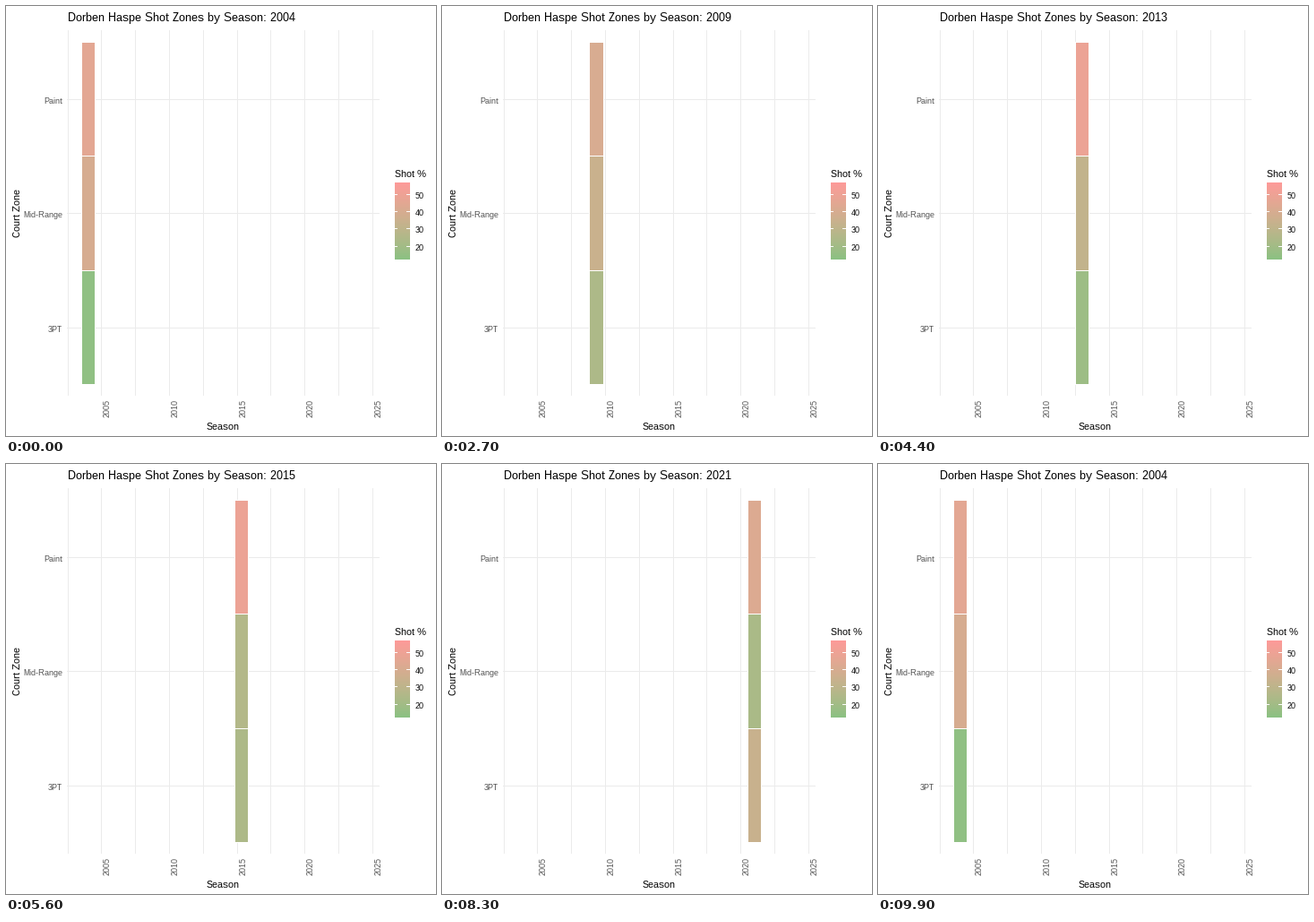
Write a matplotlib script that moves like this. It is 480x480 px and loops after 10000 ms.

```python
import numpy as np
import matplotlib.pyplot as plt
from matplotlib.animation import FuncAnimation
from matplotlib.patches import Rectangle

plt.rcParams.update({
    "font.family": "Liberation Sans",
    "text.hinting": "default",
    "text.hinting_factor": 1,
})

SIZE, DPI = 480, 72
FRAMES, INTERVAL = 100, 100
FIRST_YEAR = 2004
YEAR_W, LEFT = 15.128, 84.195    # tile width and left edge of the first tile
GRID, GREY = "#EBEBEB", "#4D4D4D"
LOW, HIGH = (138, 193, 130), (254, 154, 153)
V_MIN, V_MAX = 12.7, 57.2

# share of shots per season, in percent
three = np.array([14.5, 18.3, 20.8, 19.1, 21.9, 23.8, 25.3, 18.8, 12.7, 18.8,
                  22.6, 26.5, 19.9, 25.4, 25.7, 29.9, 32.4, 34.4, 36.7, 31.1,
                  28.6])
mid = np.array([40, 40, 36, 38, 34, 35, 34.5, 40, 38, 32, 27, 28, 22.9, 20,
                21.5, 17, 19, 23, 18, 19, 20])
shares = np.stack([100 - mid - three, mid, three], axis=1)
SEASONS = len(three)

# ---- colour scale, blended in Lab ----
RGB_XYZ = np.array([[0.4124, 0.3576, 0.1805],
                    [0.2126, 0.7152, 0.0722],
                    [0.0193, 0.1192, 0.9505]])
WHITE = RGB_XYZ.sum(axis=1)


def to_lab(rgb):
    c = np.array(rgb) / 255
    lin = np.where(c > 0.04045, ((c + 0.055) / 1.055) ** 2.4, c / 12.92)
    f = np.cbrt(RGB_XYZ @ lin / WHITE)
    return np.array([116 * f[1] - 16, 500 * (f[0] - f[1]), 200 * (f[1] - f[2])])


def to_rgb(lab):
    fy = (lab[0] + 16) / 116
    f = np.array([fy + lab[1] / 500, fy, fy - lab[2] / 200])
    lin = np.clip(np.linalg.inv(RGB_XYZ) @ (f ** 3 * WHITE), 0, 1)
    return np.where(lin > 0.0031308, 1.055 * lin ** (1 / 2.4) - 0.055, 12.92 * lin)


LAB_LOW, LAB_HIGH = to_lab(LOW), to_lab(HIGH)


def shade(value):
    t = (value - V_MIN) / (V_MAX - V_MIN)
    return to_rgb(LAB_LOW + (LAB_HIGH - LAB_LOW) * np.clip(t, 0, 1))


# ---- stage ----
fig = plt.figure(figsize=(SIZE / DPI, SIZE / DPI), dpi=DPI, facecolor="white")
ax = fig.add_axes([0, 0, 1, 1])


def box(x0, y0, x1, y1, color, z=1):
    r = Rectangle((x0, y0), x1 - x0, y1 - y0, facecolor=color, linewidth=0,
                  antialiased=False, zorder=z)
    return ax.add_patch(r)


def label(x, y, s, size, color="black", ha="left", rot=0):
    # rotated labels sit with their baseline at x and their first letter at y
    return ax.text(x, y, s, fontsize=size, color=color, rotation=rot, ha=ha,
                   va="baseline", rotation_mode="anchor", zorder=5)


# legend gradient
ramp = np.array([[shade(V_MAX - (V_MAX - V_MIN) * (i + 0.5) / 86)] for i in range(86)])
ax.imshow(ramp, extent=(434, 451, 283, 197), interpolation="nearest", aspect="auto")
ax.set_xlim(0, SIZE)
ax.set_ylim(SIZE, 0)
ax.axis("off")

# grid
for step in range(10):
    year = 2002.5 + 2.5 * step
    x = int(LEFT + (year - FIRST_YEAR + 0.5) * YEAR_W)
    box(x, 27, x + 1, 435, GRID)
    if step % 2:
        label(x + 10, 459, f"{year:.0f}", 9, GREY, rot=90)
for y, name in ((104, "Paint"), (231, "Mid-Range"), (359, "3PT")):
    box(68, y, 417, y + 1, GRID)
    label(63, y + 5, name, 9, GREY, ha="right")

label(224, 473, "Season", 11)
label(16, 258, "Court Zone", 11, rot=90)

# legend text and ticks
label(434, 191, "Shot %", 11)
for value in (50, 40, 30, 20):
    y = int(268.05 - (value - 20) * 1.927)
    box(434, y, 437, y + 1, "white", 3)
    box(447, y, 451, y + 1, "white", 3)
    label(457, y + 5, str(value), 9)

title = label(69, 17, "", 13)

# white backing gives the tiles their borders
back = box(0, 40, 1, 423, "white", 3)
tiles = [box(0, top, 1, bottom, "white", 4)
         for top, bottom in ((41, 167), (168, 295), (296, 422))]


def timing(k):
    """First frame and number of steps of the move away from season k."""
    if k < 10:
        return 2 + 5 * k, 3
    if k < 17:
        return 1 + 5 * k, 3
    return 86 + 4 * (k - 17), 2


def state(frame):
    """Season left, season entered, and how far the move has gone."""
    for k in range(SEASONS):
        start, steps = timing(k)
        if frame < start:
            return k, k, 0.0
        done = frame - start + 1
        if done < steps:
            return k, (k + 1) % SEASONS, done / steps
    return 0, 0, 0.0


def draw(frame):
    a, b, t = state(frame)
    left = LEFT + (a + (b - a) * t) * YEAR_W
    x0, x1 = int(left), int(left + YEAR_W)
    back.set_x(x0)
    back.set_width(x1 + 1 - x0)
    values = shares[a] + (shares[b] - shares[a]) * t
    for tile, value in zip(tiles, values):
        tile.set_x(x0 + 1)
        tile.set_width(x1 - x0 - 1)
        tile.set_facecolor(shade(value))
    year = FIRST_YEAR + (b if t > 0.5 else a)
    title.set_text(f"Dorben Haspe Shot Zones by Season: {year}")
    return [back, title, *tiles]


anim = FuncAnimation(fig, draw, frames=FRAMES, interval=INTERVAL,
                     init_func=lambda: draw(0), repeat=True, repeat_delay=0)
plt.show()
```
